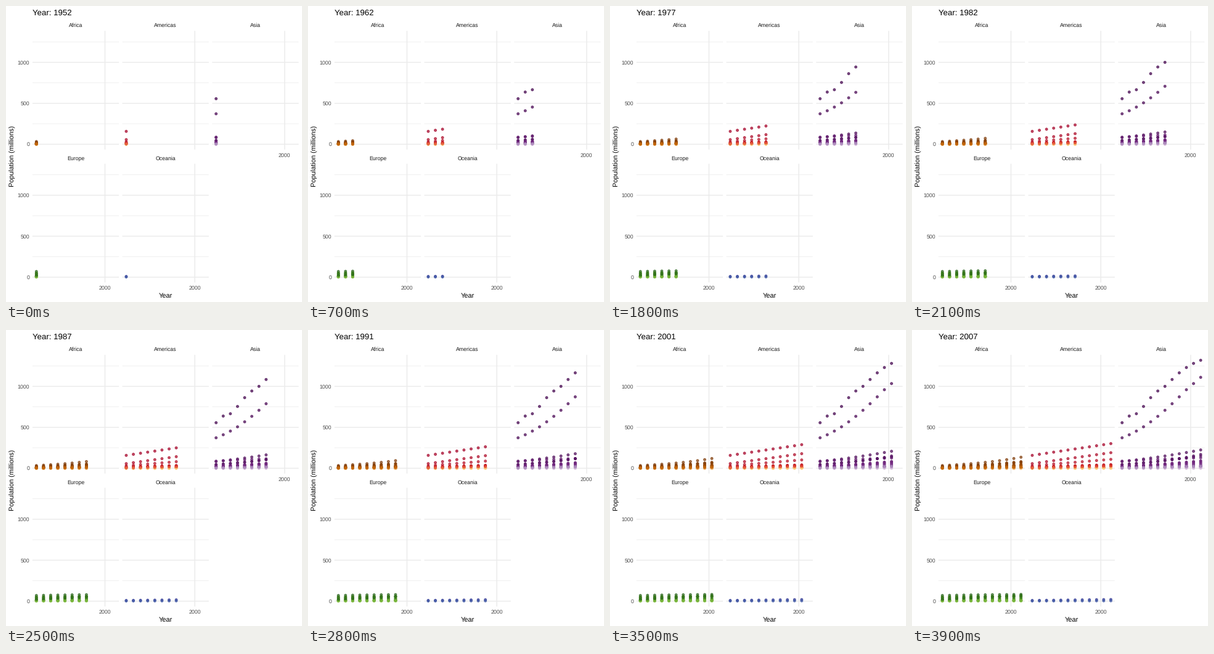
A matplotlib script that plays this animation: 480x480 px, repeating every 4 s.

```python
import random

import matplotlib.pyplot as plt
import numpy as np
from matplotlib.animation import FuncAnimation
from matplotlib.colors import LinearSegmentedColormap

plt.rcParams["font.family"] = "Liberation Sans"
plt.rcParams["text.hinting"] = "none"

SIZE = 480
FRAMES = 40
STEPS = 12                       # one column of dots every five years
PANEL_W, PANEL_H = 140.2, 192.6
LEFTS = [42.9, 188.6, 334.3]
TOPS = [40.3, 255.8]
ZERO = 183.9                     # y of zero below a panel's top
PER_MILLION = 66.4 / 500
MAJOR, MINOR = 1.42, 0.71        # grid line widths

# Millions in 1952 and 2007, with an optional growth exponent
AFRICA = {
    "Algeria": (9.3, 33.3), "Congo": (14.1, 64.6), "Egypt": (22.2, 80.3),
    "Ethiopia": (20.9, 76.5), "Ghana": (5.6, 22.9), "Kenya": (6.5, 35.6),
    "Morocco": (9.9, 33.8), "Nigeria": (33.1, 135), "South Africa": (14.3, 44),
    "Sudan": (8.5, 42.3), "Tanzania": (8.3, 38.1), "Uganda": (5.8, 29.2),
    "Zambia": (2.7, 11.7), "Zimbabwe": (3.1, 12.3),
}
AMERICAS = {
    "Argentina": (17.9, 40.3), "Brazil": (56.6, 190), "Canada": (14.8, 33.4),
    "Chile": (6.4, 16.3), "Colombia": (12.4, 44.2), "Mexico": (30.1, 108.7),
    "Peru": (8, 28.7), "Trinidad": (0.7, 1.1), "United States": (157.6, 301.1),
    "Uruguay": (2.3, 3.4), "Venezuela": (5.4, 26.1),
}
ASIA = {
    "Afghanistan": (8.4, 31.9), "Bangladesh": (46.9, 150.4),
    "Indonesia": (82.1, 223.5), "Iran": (17.3, 69.5), "Iraq": (5.4, 27.5),
    "Japan": (86.5, 127.5, 3), "Korea N": (8.9, 23.3), "Korea S": (20.9, 49, 2),
    "Malaysia": (6.7, 24.8), "Myanmar": (20.1, 47.8), "Nepal": (9.2, 28.9),
    "Pakistan": (41.3, 169.3, 0.1), "Philippines": (22.4, 91.1),
    "Saudi Arabia": (4, 27.6), "Sri Lanka": (8, 20.4), "Taiwan": (8.6, 23.2, 2),
    "Thailand": (21.3, 65.1, 1), "Vietnam": (26.2, 85.3),
    "West Bank": (1, 4), "Yemen": (5, 22.2),
}
EUROPE = {
    "France": (42.5, 61.1, 2), "Germany": (69.1, 82.4, 7), "Italy": (47.7, 58.1, 9),
    "Netherlands": (10.4, 16.6), "Poland": (25.7, 38.5), "Romania": (16.6, 22.3),
    "Spain": (28.5, 40.4), "Switzerland": (4.8, 7.6), "Turkey": (22.2, 71.2, 1),
    "United Kingdom": (50.4, 60.8),
}
OCEANIA = {"Australia": (8.7, 20.4), "New Zealand": (2, 4.1)}

CHINA = [556.3, 637.4, 665.8, 754.6, 862, 943.5,
         1000.3, 1084, 1165, 1230.1, 1280.4, 1318.7]
INDIA = [372, 409, 454, 506, 567, 634, 708, 788, 872, 959, 1034.2, 1110.4]


def growth(start, end, power):
    u = np.linspace(0, 1, STEPS)
    return (start**power + (end**power - start**power) * u) ** (1 / power)


def small_countries(count, largest, decay, factor, power):
    """Minor countries, shrinking by rank and mixed into the drawing order."""
    rng = random.Random(count)
    out = {}
    for k in range(count):
        end = largest * np.exp(-decay * k)
        out[rng.choice("BCEGHLMNPRS") + str(k)] = growth(end / factor, end, power)
    return out


def continent(known, power, ramp, small=None, extra=None):
    """Populations in drawing order, with colours ranked by final size."""
    series = {name: growth(v[0], v[1], v[2] if len(v) > 2 else power)
              for name, v in known.items()}
    series.update(extra or {})
    if small:
        series.update(small_countries(*small, power))
    names = sorted(series)
    ranked = sorted(names, key=lambda n: -series[n][-1])
    cmap = LinearSegmentedColormap.from_list("ramp", ramp, N=1024)
    colors = [cmap(ranked.index(n) / (len(names) - 1), alpha=0.7) for n in names]
    return np.array([series[n] for n in names]), colors


PANELS = [
    ("Africa", 0, 0, continent(
        AFRICA, 0.05, ["#7F3B08", "#B35806", "#E08214", "#FDB863", "#FEE0B6"],
        (38, 20, 0.12, 3.3))),
    ("Americas", 1, 0, continent(
        AMERICAS, 1, ["#A50026", "#D73027", "#F46D43", "#FDAE61", "#FEE090"],
        (14, 13.8, 0.12, 2.9))),
    ("Asia", 2, 0, continent(
        ASIA, 0.45, ["#40004B", "#762A83", "#9970AB", "#C2A5CF", "#E7D4E8"],
        (11, 19.3, 0.25, 3.8), {"China": CHINA, "India": INDIA})),
    ("Europe", 0, 1, continent(
        EUROPE, 4, ["#276419", "#4D9221", "#7FBC41", "#B8E186", "#E6F5D0"],
        (20, 10.7, 0.1, 1.25))),
    ("Oceania", 1, 1, continent(OCEANIA, 1, ["#313695", "#3B55A4"])),
]

fig = plt.figure(figsize=(SIZE / 72, SIZE / 72), dpi=72, facecolor="white")
ax = fig.add_axes([0, 0, 1, 1])
ax.set_xlim(0, SIZE)
ax.set_ylim(SIZE, 0)
ax.axis("off")


def label(x, y, text, size, color="black", ha="center", **kw):
    return ax.text(x, y, text, fontsize=size, color=color, ha=ha,
                   va="baseline", **kw)


def grid_line(xs, ys, width):
    ax.plot(xs, ys, color="#EBEBEB", lw=width, solid_capstyle="butt",
            snap=False, zorder=1)


def year_x(col, step):
    return LEFTS[col] + PANEL_W / 1.1 * (0.05 + step / (STEPS - 1))


def pop_y(row, millions):
    return TOPS[row] + ZERO - PER_MILLION * millions


for name, col, row, _ in PANELS:
    left, top = LEFTS[col], TOPS[row]
    for value in range(0, 1251, 250):
        y = pop_y(row, value)
        grid_line([left, left + PANEL_W], [y, y], MINOR if value % 500 else MAJOR)
        if col == 0 and value % 500 == 0:
            label(38.2, y + 3.2, str(value), 8.8, "#4D4D4D", "right")
    x = year_x(col, 9.6)
    grid_line([x, x], [top, top + PANEL_H], MAJOR)
    if row == 1 or col == 2:
        label(x - 0.3, top + PANEL_H + 11.6, "2000", 8.8, "#4D4D4D")
    label(left + PANEL_W / 2, top - 5.9, name, 8.8, "#1A1A1A")

label(258.8, 473, "Year", 11)
label(14.1, 243.6, "Population (millions)", 11, rotation=90, rotation_mode="anchor")
title = label(42.9, 15.2, "", 13.2, ha="left")

colors = [c for *_, (_, cs) in PANELS for c in cs]
dots = ax.scatter([], [], s=3.91**2, linewidths=0.945, zorder=2)
dots.set_facecolor(colors)
dots.set_edgecolor(colors)

KEYS = [round((FRAMES - 1) * k / (STEPS - 1)) for k in range(STEPS)]


def column(step):
    """All countries at a possibly fractional five-year step."""
    k = min(int(step), STEPS - 2)
    t = step - k
    parts = []
    for _, col, row, (pops, _) in PANELS:
        pop = pops[:, k] * (1 - t) + pops[:, k + 1] * t
        parts.append(np.column_stack([np.full(len(pop), year_x(col, step)),
                                      pop_y(row, pop)]))
    return np.vstack(parts)


def draw(i):
    step = np.interp(i, KEYS, range(STEPS))
    trail = [column(k) for k in range(STEPS) if KEYS[k] < i]
    dots.set_offsets(np.vstack(trail + [column(step)]))
    title.set_text(f"Year: {round(1952 + 55 * i / (FRAMES - 1))}")
    return dots, title


anim = FuncAnimation(fig, draw, frames=FRAMES, interval=100,
                     init_func=lambda: draw(0), repeat=True, repeat_delay=0)
plt.show()
```
